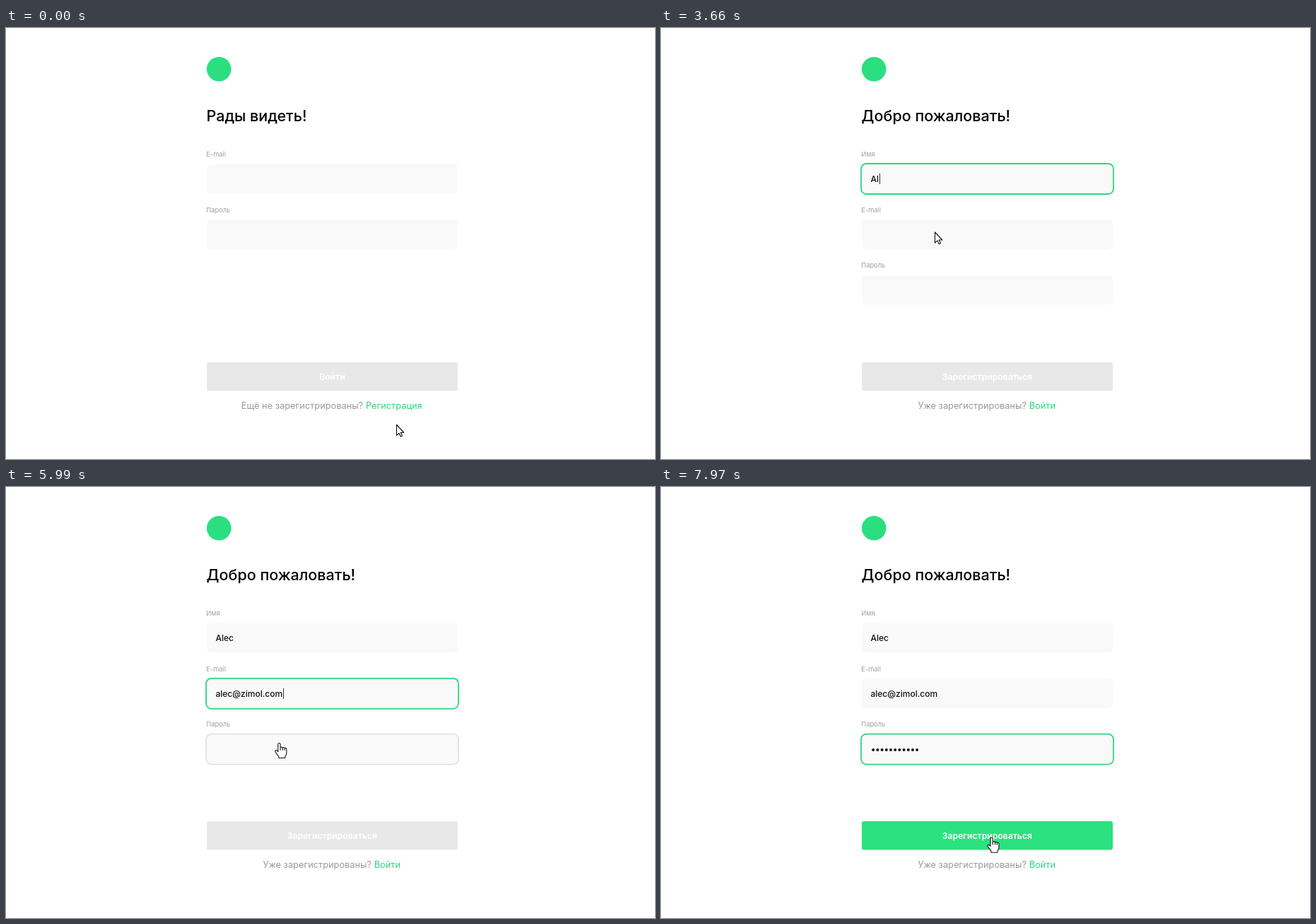
An HTML page that plays this animation: 918 by 610 pixels, repeating every 7990 ms.

```html
<!DOCTYPE html>
<html lang="ru">
<head>
<meta charset="utf-8">
<title>Регистрация</title>
<style>
  html, body { margin: 0; width: 100%; height: 100%; overflow: hidden; background: #fff; }
  svg { display: block; width: 918px; height: 610px; font-family: Inter, "Liberation Sans", sans-serif; }
  .title { font-size: 21.5px; font-weight: 500; fill: #000; }
  .label { font-size: 9.3px; fill: #a0a0a0; }
  .value { font-size: 12px; font-weight: 500; fill: #111; }
  .action { font-size: 12.2px; font-weight: 600; fill: #fff; text-anchor: middle; }
  .hint, .link { font-size: 12.8px; text-anchor: middle; }
  .hint { fill: #999; }
  .link { fill: #2fd47f; }
  .box { fill: #f9f9f9; }
  .ring { fill: none; stroke-width: 1.8; }
  .hover { stroke: #e3e3e3; }
  .focus { stroke: #2bd77d; }
  .caret { fill: #333; }
  .dots { stroke: #111; stroke-width: 4; stroke-linecap: round; stroke-dasharray: 0 6.2; }
  .underline { fill: #2fd47f; }
  .cursor path { fill: #fff; stroke: #111; stroke-width: 1.1; stroke-linejoin: round; }
</style>
</head>
<body>
<svg viewBox="0 0 918 610">
  <circle cx="301.2" cy="58.2" r="17.3" fill="#2bdf80"/>
  <text class="title" id="title" x="283.6" y="132"/>
  <g id="fields"></g>
  <rect id="button" x="284" y="473" width="355" height="40.5" rx="3"/>
  <text class="action" id="action" x="461.4" y="498"/>
  <text class="hint" id="hint" y="539"/>
  <text class="link" id="link" y="539"/>
  <rect class="underline" id="underline" y="541" height="1"/>
  <g class="cursor" id="cursor">
    <path id="arrow" d="M.5 .5V15.6L4 12.4 6.3 17.3 8.5 16.3 6.3 11.5H10.8Z"/>
    <path id="hand" d="M-2 12.5V2Q-2 .3-.4 .3T1.3 2V7.5Q1.4 5.8 2.9 5.8T4.5 7.5Q4.7 6.4 5.9 6.4T7.3 8Q7.5 7.2 8.5 7.2 10 7.2 10 9V14Q10 17 8 19V21.3H-1V19.3L-5.5 13.2Q-6.7 11-5.2 10.4-4 10-2 12.5ZM1.3 7.5V10.5M4.5 7.5V10.5M7.3 8V10.5"/>
  </g>
</svg>
<script>
const LOOP = 7990, SWITCH = 1110, BLINK = 530, FADE = 270;
const $ = id => document.getElementById(id);
const clamp = v => Math.min(1, Math.max(0, v));
const show = (el, on) => el.setAttribute('visibility', on ? 'visible' : 'hidden');
const attrs = (el, values) => {
  for (const key in values) el.setAttribute(key, values[key]);
  return el;
};
const make = (parent, tag, values) => parent.appendChild(
  attrs(document.createElementNS('http://www.w3.org/2000/svg', tag), values));
const every = (start, step, count) => Array.from({ length: count }, (_, i) => start + i * step);

const pages = [
  { title: 'Рады видеть!', labels: ['E-mail', 'Пароль'], action: 'Войти',
    hint: 'Ещё не зарегистрированы?', hintX: 419, link: 'Регистрация', linkX: 548.8, linkW: 79 },
  { title: 'Добро пожаловать!', labels: ['Имя', 'E-mail', 'Пароль'], action: 'Зарегистрироваться',
    hint: 'Уже зарегистрированы?', hintX: 440.2, link: 'Войти', linkX: 539.4, linkW: 37 }
];

// Focus interval and the moment of each key press
const inputs = [
  { text: 'Alec', from: 1960, to: 4570, keys: [3370, 3640, 3850, 3960] },
  { text: 'alec@zimol.com', from: 4570, to: 6130, keys: every(5130, 48, 14) },
  { secret: true, from: 6130, to: LOOP + 1, keys: every(6860, 58, 11) }
];

// Pointer path: time, x, y
const path = [
  [0, 552, 561], [370, 552, 561], [600, 551, 550], [860, 549, 536],
  [1370, 549, 536], [1520, 443, 291], [1680, 410, 243], [1900, 399, 224], [2150, 396, 212],
  [2870, 396, 212], [3120, 393, 290], [3370, 391, 344],
  [3610, 391, 344], [3660, 387, 288.5],
  [3810, 387, 288.5], [3980, 387, 301.5],
  [4230, 387, 301.5], [4870, 390, 293],
  [5330, 390, 293], [5780, 387, 360],
  [5940, 387, 360], [6200, 386, 371], [6450, 387, 365.5],
  [7250, 387, 365.5], [7480, 430, 450], [7630, 437, 478], [7800, 462, 501], [7970, 468, 496]
];

function pointer(t) {
  const i = path.findIndex(p => p[0] > t);
  if (i === 0) return path[0].slice(1);
  if (i < 0) return path[path.length - 1].slice(1);
  const [a, b] = [path[i - 1], path[i]];
  const k = (t - a[0]) / (b[0] - a[0]);
  return [a[1] + (b[1] - a[1]) * k, a[2] + (b[2] - a[2]) * k];
}

const pageAt = t => pages[t < SWITCH ? 0 : 1];
const fieldTop = i => 193 + i * 78.8;
const inside = ([x, y], left, top, w, h) => x >= left && x <= left + w && y >= top && y <= top + h;

// Interface reaction trails the pointer slightly
const settled = t => pointer(Math.max(0, t - 30));
const overField = (t, i) => inside(settled(t), 284, fieldTop(i), 355, 41);
const overLink = t => {
  const { linkX, linkW } = pageAt(t);
  return inside(settled(t), linkX - linkW / 2, 527, linkW, 18);
};
const hoverLevel = (t, i) => every(0, 30, 5).filter(d => overField(t - d, i)).length / 5;

const fields = inputs.map((input, i) => {
  const g = make($('fields'), 'g', {}), y = fieldTop(i);
  const ring = kind => make(g, 'rect',
    { class: 'ring ' + kind, x: 283, y: y - 1, width: 357, height: 43, rx: 7.5 });
  return {
    g,
    label: make(g, 'text', { class: 'label', x: 283.3, y: y - 11.2 }),
    box: make(g, 'rect', { class: 'box', x: 284, y, width: 355, height: 41, rx: 6 }),
    hover: ring('hover'),
    focus: ring('focus'),
    value: make(g, 'text', { class: 'value', x: 296.4, y: y + 24.8 }),
    dots: make(g, 'line', { class: 'dots', x1: 300.2, y1: y + 21.4, y2: y + 21.4 }),
    caret: make(g, 'rect', { class: 'caret', y: Math.round(y + 13), width: 1, height: 15 })
  };
});

function drawField(t, i, label) {
  const input = inputs[i], f = fields[i];
  show(f.g, label);
  f.label.textContent = label || '';
  f.hover.setAttribute('opacity', hoverLevel(t, i));
  f.focus.setAttribute('opacity', clamp((t - input.from) / FADE) - clamp((t - input.to) / FADE));

  const typed = input.keys.filter(k => k <= t);
  const n = typed.length;
  f.value.textContent = input.secret ? '' : input.text.slice(0, n);
  f.dots.setAttribute('x2', 300.2 + 6.2 * (n - 1) + 0.1);
  f.dots.setAttribute('display', input.secret && n ? 'inline' : 'none');

  const width = input.secret ? n * 6.15 : n ? f.value.getComputedTextLength() - 0.5 : 0;
  const last = n ? typed[n - 1] : input.from;
  const lit = t >= input.from && t < input.to && Math.floor((t - last) / BLINK) % 2 === 0;
  f.caret.setAttribute('x', Math.round(297.6 + width));
  f.caret.setAttribute('display', lit ? 'inline' : 'none');
}

function drawButton(t) {
  const k = clamp((t - inputs[2].keys[7]) / 150);
  const mix = (a, b) => Math.round(a + (b - a) * k);
  $('button').setAttribute('fill', `rgb(${mix(232, 43)},${mix(232, 225)},${mix(232, 128)})`);
}

function draw(t) {
  const page = pageAt(t);
  for (const id of ['title', 'action', 'hint', 'link']) $(id).textContent = page[id];
  $('hint').setAttribute('x', page.hintX);
  $('link').setAttribute('x', page.linkX);
  attrs($('underline'), { x: page.linkX - page.linkW / 2, width: page.linkW });
  inputs.forEach((_, i) => drawField(t, i, page.labels[i]));
  drawButton(t);

  const onLink = overLink(t);
  const onField = page.labels.some((_, i) => overField(t, i));
  const onButton = inside(settled(t), 284, 473, 355, 40);
  const hand = onLink || onField || onButton;
  show($('underline'), onLink);
  show($('hand'), hand);
  show($('arrow'), !hand);
  $('cursor').setAttribute('transform', `translate(${pointer(t)})`);
}

const start = performance.now();
function tick() {
  draw((performance.now() - start) % LOOP);
  requestAnimationFrame(tick);
}
tick();
</script>
</body>
</html>
```
